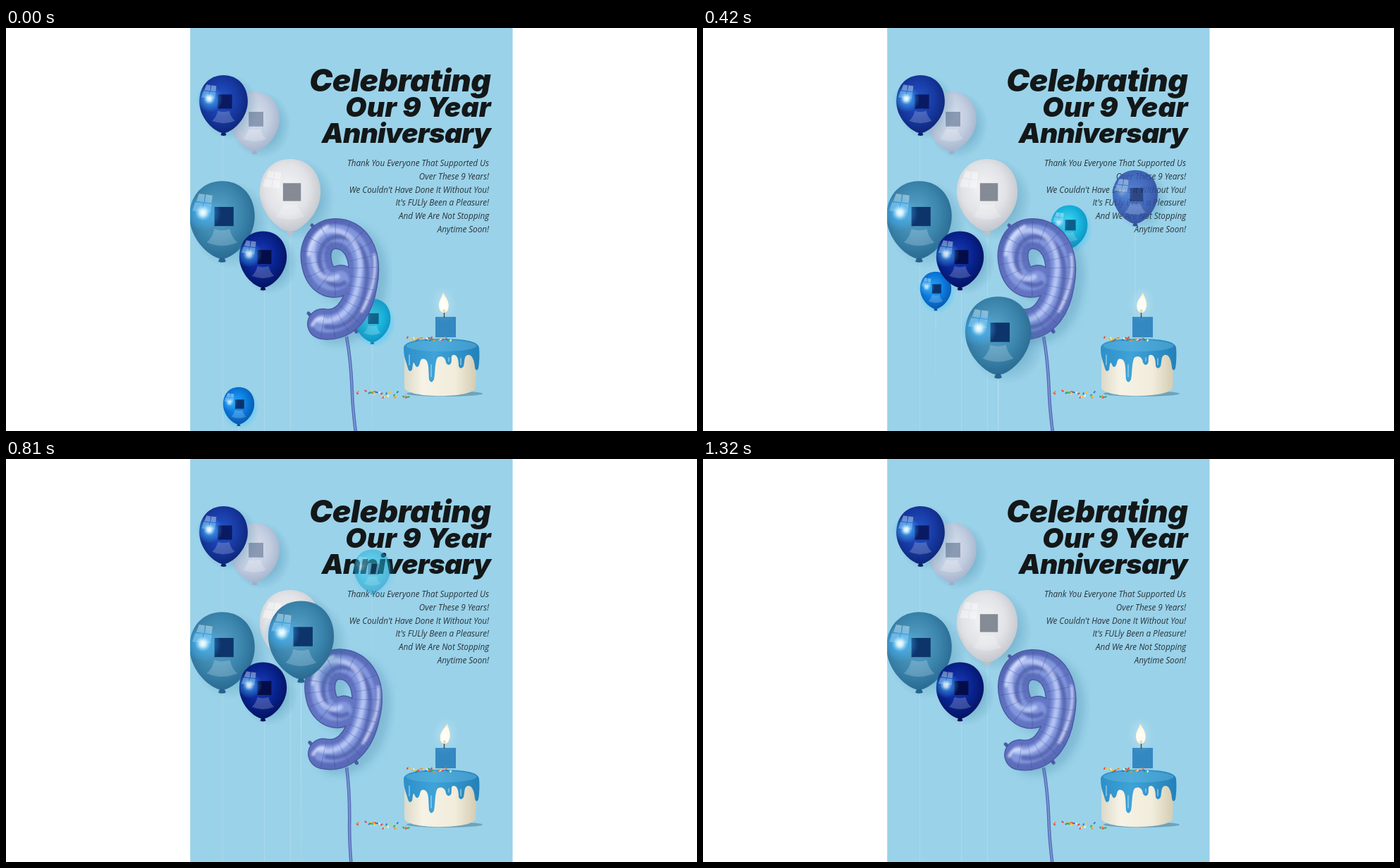
An HTML page for the animation above (1350 ms loop, 980 by 572 pixels).

```html
<!DOCTYPE html>
<html lang="en">
<head>
<meta charset="utf-8">
<title>Anniversary card</title>
<style>
  html, body { margin: 0; width: 100%; height: 100%; overflow: hidden; background: #fff; }
  svg { display: block; }
  .title { font: italic 900 39px Inter, sans-serif; letter-spacing: -.8px; fill: #131718; text-anchor: end; }
  .title .big { font-size: 44px; letter-spacing: -.35px; }
  .title .wide { letter-spacing: .2px; }
  .body { font: italic 500 11.7px "Open Sans", sans-serif; fill: #2a343b; text-anchor: end; }
</style>
</head>
<body>
<svg width="980" height="572" viewBox="0 0 980 572">
  <defs>
    <radialGradient id="flare">
      <stop offset="0" stop-color="#fff"/>
      <stop offset=".18" stop-color="#d5f5ff" stop-opacity=".9"/>
      <stop offset=".45" stop-color="#45b8ff" stop-opacity=".5"/>
      <stop offset="1" stop-color="#45b8ff" stop-opacity="0"/>
    </radialGradient>
    <radialGradient id="shade">
      <stop offset=".55" stop-color="#2d7396" stop-opacity=".28"/>
      <stop offset="1" stop-color="#2d7396" stop-opacity="0"/>
    </radialGradient>
    <radialGradient id="glow">
      <stop offset=".6" stop-color="#2fc3ff" stop-opacity=".5"/>
      <stop offset="1" stop-color="#2fc3ff" stop-opacity="0"/>
    </radialGradient>
    <linearGradient id="thread" x1="0" y1="0" x2="0" y2="1">
      <stop offset="0" stop-color="#fff" stop-opacity=".3"/>
      <stop offset="1" stop-color="#fff" stop-opacity="0"/>
    </linearGradient>
    <linearGradient id="sponge">
      <stop offset="0" stop-color="#dcd9c8"/>
      <stop offset=".25" stop-color="#f6f3e6"/>
      <stop offset=".7" stop-color="#f1ecdb"/>
      <stop offset="1" stop-color="#d3cbb2"/>
    </linearGradient>
    <linearGradient id="icing">
      <stop offset="0" stop-color="#2c8fc8"/>
      <stop offset=".4" stop-color="#3fa3d8"/>
      <stop offset="1" stop-color="#2380b8"/>
    </linearGradient>
    <linearGradient id="foil" gradientUnits="userSpaceOnUse" x1="425" y1="280" x2="525" y2="440">
      <stop offset="0" stop-color="#5163b0"/>
      <stop offset=".45" stop-color="#6577c4"/>
      <stop offset="1" stop-color="#5464b2"/>
    </linearGradient>
    <radialGradient id="fire" cx=".5" cy=".65" r=".6">
      <stop offset="0" stop-color="#fff"/>
      <stop offset=".7" stop-color="#fffbe9"/>
      <stop offset="1" stop-color="#f7e7b4"/>
    </radialGradient>
    <filter id="soft" x="-40%" y="-40%" width="180%" height="180%"><feGaussianBlur stdDeviation="6"/></filter>
    <filter id="smooth" x="-20%" y="-20%" width="140%" height="140%"><feGaussianBlur stdDeviation="1.6"/></filter>
    <path id="shell" d="M0-41C21-41 34-25 34-4C34 17 17 35 4 39.5H-4C-17 35-34 17-34-4C-34-25-21-41 0-41Z"/>
    <path id="nine" d="M449 420C478 425 499 402 505 364C514 319 494 291 466 292C444 293 436 315 441 336C446 358 462 366 475 358"/>
    <path id="ribbon" d="M483 438C488 465 490 490 491 520C492 545 494 560 498 590"/>
  </defs>

  <svg x="261.200" width="457.300" height="572" viewBox="261.200 0 457.300 572">
    <rect x="261" width="458" height="572" fill="#9ad2e9"/>
    <path d="M307.5 152V572M366.5 370V572M403.5 290V572" stroke="#fff" stroke-opacity=".17"/>
    <g class="title">
      <text class="big" x="687.500" y="90">Celebrating</text>
      <text class="wide" x="688" y="126">Our 9 Year</text>
      <text x="687" y="163">Anniversary</text>
    </g>
    <g class="body" id="lines"></g>
    <g id="low"></g>
    <g id="still"></g>
    <g id="behind"></g>

    <g id="foilNine">
      <use href="#ribbon" fill="none" stroke="#566fb5" stroke-width="4.6"/>
      <use href="#ribbon" fill="none" stroke="#7f9bdb" stroke-width="1.6"/>
      <g fill="none" stroke-linecap="round">
        <use href="#nine" stroke="#2d7396" stroke-opacity=".25" stroke-width="42" transform="translate(13 7)" filter="url(#soft)"/>
        <path d="M429 405L434 410M434 280L441 287M495 428L497 431" stroke="#4a5aa8" stroke-width="5"/>
        <use href="#nine" stroke="#4a5aa4" stroke-width="44"/>
        <use href="#nine" stroke="url(#foil)" stroke-width="41"/>
        <g filter="url(#smooth)">
          <use href="#nine" stroke="#8195dc" stroke-width="25" transform="translate(-1 -1)"/>
          <use href="#nine" stroke="#42509c" stroke-opacity=".6" stroke-width="7" transform="translate(5 4)"/>
          <use href="#nine" stroke="#c6d3fb" stroke-opacity=".75" stroke-width="7" transform="translate(-5 -5)"/>
          <path d="M522 322C526 346 520 376 505 402M434 422C437 415 443 411 450 412M429 322C431 305 440 291 456 281" stroke="#dce5ff" stroke-opacity=".8" stroke-width="4"/>
        </g>
        <use href="#nine" stroke="#3f4d99" stroke-opacity=".35" stroke-width="38" stroke-linecap="butt" stroke-dasharray="1 13"/>
      </g>
    </g>

    <g id="middle"></g>

    <g id="cake">
      <ellipse cx="622" cy="519" rx="54" ry="4" fill="#4b7f97" opacity=".55"/>
      <path d="M565 458V511C570 526 661 526 666 511L668 458Z" fill="url(#sponge)"/>
      <path d="M564 454C565 445 582 441 617 441C653 441 670 445 671 454C672 466 671 477 670 483Q667 489 665 482C664 471 661 464 656 464C649 464 651 474 649 480Q645 486 642 480C642 468 639 463 634 464C630 465 633 472 631 476Q627 481 624 475C623 467 618 465 613 467C608 470 609 490 607 499Q603 506 600 499C599 484 600 473 594 470C586 467 588 477 585 480Q582 483 580 478C577 470 577 480 576 485Q572 490 570 483C568 474 564 469 564 454Z" fill="url(#icing)"/>
      <ellipse cx="617.5" cy="451" rx="50" ry="8" fill="#5fb5e0" opacity=".5"/>
      <path d="M572 464V478M603 478V495M645 469V478M628 468V473" stroke="#a9dcf3" stroke-opacity=".8" stroke-width="1.4" stroke-linecap="round"/>
      <rect x="609" y="410" width="29" height="29" fill="#3488c2"/>
      <path d="M621.5 411V401" stroke="#333" stroke-width="1.4"/>
      <g id="sprinkles" stroke-width="2" stroke-linecap="round"></g>
      <g id="flame">
        <ellipse cx="621.5" cy="391" rx="11" ry="18" fill="#fff" opacity=".22" filter="url(#soft)"/>
        <path d="M622 375C625 382 629 388 628.5 394C628 401 625 404 621.5 404C617.500 404 614.500 400 614.500 394C614.500 387 620 382 622 375Z" fill="url(#fire)"/>
        <path d="M619 402Q621.500 396 624 402Q621.500 405 619 402Z" fill="#d9c591" opacity=".6"/>
      </g>
    </g>
    <g id="front"></g>
  </svg>
</svg>

<script>
const $ = id => document.getElementById(id);
const LOOP = 1350, STEP = 30, TAU = Math.PI * 2;
const clamp = v => Math.max(0, Math.min(1, v));
const wave = (t, peak) => Math.cos(TAU * (t - peak) / LOOP);

[
  'Thank You Everyone That Supported Us',
  'Over These 9 Years!',
  "We Couldn't Have Done It Without You!",
  "It's FULly Been a Pleasure!",
  'And We Are Not Stopping',
  'Anytime Soon!'
].forEach((s, i) => {
  $('lines').innerHTML += `<text x="685" y="${196 + i * 18.75}">${s}</text>`;
});

// light, main, dark, badge, flare strength
const SKINS = {
  royal: ['#2456cc', '#1739a2', '#0b2270', '#0a1a62', 1],
  lilac: ['#dbe2f0', '#c4cee1', '#9fafc9', '#8b9ab2', 0],
  white: ['#f4f4f6', '#e2e3e7', '#bcc0c7', '#858b94', 0],
  steel: ['#5aa5ca', '#3c86ae', '#25648b', '#0d356c', 1],
  navy: ['#1a3cba', '#08228c', '#030f58', '#040d48', .9],
  azure: ['#26a5f7', '#0a77da', '#0950a0', '#08336f', .8],
  cyan: ['#4ddcf4', '#18b4dd', '#0c8bb8', '#0b5f8a', .7],
  violet: ['#4d74cd', '#3457b3', '#233d8c', '#1c2f74', .35]
};
for (const [name, [light, main, dark]] of Object.entries(SKINS)) {
  document.querySelector('defs').insertAdjacentHTML('beforeend',
    `<radialGradient id="${name}" cx=".45" cy=".42" r=".64">
      <stop offset="0" stop-color="${light}"/><stop offset=".55" stop-color="${main}"/>
      <stop offset="1" stop-color="${dark}"/></radialGradient>`);
}

function balloon(layer, skin, x, y, scale, thread = 0) {
  const [, , dark, badge, flare] = SKINS[skin];
  const halo = skin === 'azure' || skin === 'cyan' ? 'glow' : 'shade';
  const g = document.createElementNS('http://www.w3.org/2000/svg', 'g');
  g.innerHTML = `
    <rect x="-.4" y="43" width=".9" height="${thread}" fill="url(#thread)"/>
    <ellipse cx="${halo === 'glow' ? 3 : 9}" cy="4" rx="41" ry="46" fill="url(#${halo})"/>
    <path d="M-2 38L-4 43Q0 45 4 43L2 38Z" fill="${dark}"/>
    <use href="#shell" fill="url(#${skin})"/>
    <path d="M-8 9Q0 12 8 9Q10 18 16 23Q0 30-16 23Q-10 18-8 9Z" fill="#fff" opacity=".2"/>
    <path d="M-24-28L-18-27L-19-19L-27-20ZM-17-27L-10-26L-11-18L-18-19ZM-28-19L-20-18L-21-9L-31-10ZM-19-18L-11-17L-12-8L-20-9Z" fill="#fff" opacity=".4"/>
    <rect x="-8" y="-14" width="20" height="20" fill="${badge}"/>
    <circle cx="-20" cy="-8" r="19" fill="url(#flare)" opacity="${flare}"/>`;
  $(layer).append(g);
  return place(g, x, y, scale);
}
function place(g, x, y, scale) {
  g.setAttribute('transform', `translate(${x} ${y}) scale(${scale})`);
  return g;
}

balloon('still', 'lilac', 352.5, 133.5, 1.04);
balloon('still', 'royal', 308.5, 108.5, 1.01);
balloon('still', 'white', 403, 238, 1.27);
balloon('still', 'steel', 306.5, 273, 1.36);
balloon('still', 'navy', 364.5, 329, .99);

// rising balloons: start height, speed in px/ms, opacity over time
const rising = [
  { layer: 'low', skin: 'azure', x: 330, y: 536.5, v: .39, scale: .65, alpha: t => clamp((760 - t) / 160) },
  { layer: 'behind', skin: 'cyan', x: 519.5, y: 415.5, v: .316, scale: .76, alpha: t => clamp((990 - t) / 350) },
  { layer: 'middle', skin: 'violet', x: 613, y: 614, v: .89, scale: .94,
    alpha: t => clamp((t - 100) / 280) * clamp((600 - t) / 210) },
  { layer: 'front', skin: 'steel', x: 418.5, y: 631, v: .461, scale: 1.37, alpha: t => clamp((1140 - t) / 110) }
];
for (const r of rising) r.node = balloon(r.layer, r.skin, r.x, r.y, r.scale, 230);

let seed = 9;
const rand = () => (seed = seed * 16807 % 2147483647) / 2147483647;
const candy = ['#e8473f', '#f4c53a', '#3aa85a', '#f6f3ea', '#2a7fc4', '#f08a3c'];
function sprinkle(count, x, y, w, h) {
  for (let i = 0; i < count; i++) {
    const px = x + rand() * w, py = y + rand() * h, a = rand() * TAU;
    $('sprinkles').innerHTML += `<path d="M${px} ${py}l${2.2 * Math.cos(a)} ${1.5 * Math.sin(a)}" stroke="${candy[i % candy.length]}"/>`;
  }
}
sprinkle(30, 569, 439, 70, 5);
sprinkle(13, 494, 515, 38, 4);
sprinkle(15, 530, 516, 43, 9);

function draw(t) {
  for (const r of rising) {
    place(r.node, r.x, r.y - r.v * t, r.scale).setAttribute('opacity', r.alpha(t));
    // inserted anew so that parts which began off stage are painted
    $(r.layer).replaceChildren(r.node);
  }
  $('foilNine').setAttribute('transform', `rotate(${1.85 * (.56 - wave(t, 210))} 485 440)`);
  $('flame').setAttribute('transform', `rotate(${2 - 6 * wave(t, 15)} 621.5 404)`);
}

let start;
function tick(now) {
  start ??= now;
  draw(Math.floor((now - start) % LOOP / STEP) * STEP);
  requestAnimationFrame(tick);
}
draw(0);
requestAnimationFrame(tick);
</script>
</body>
</html>
```
